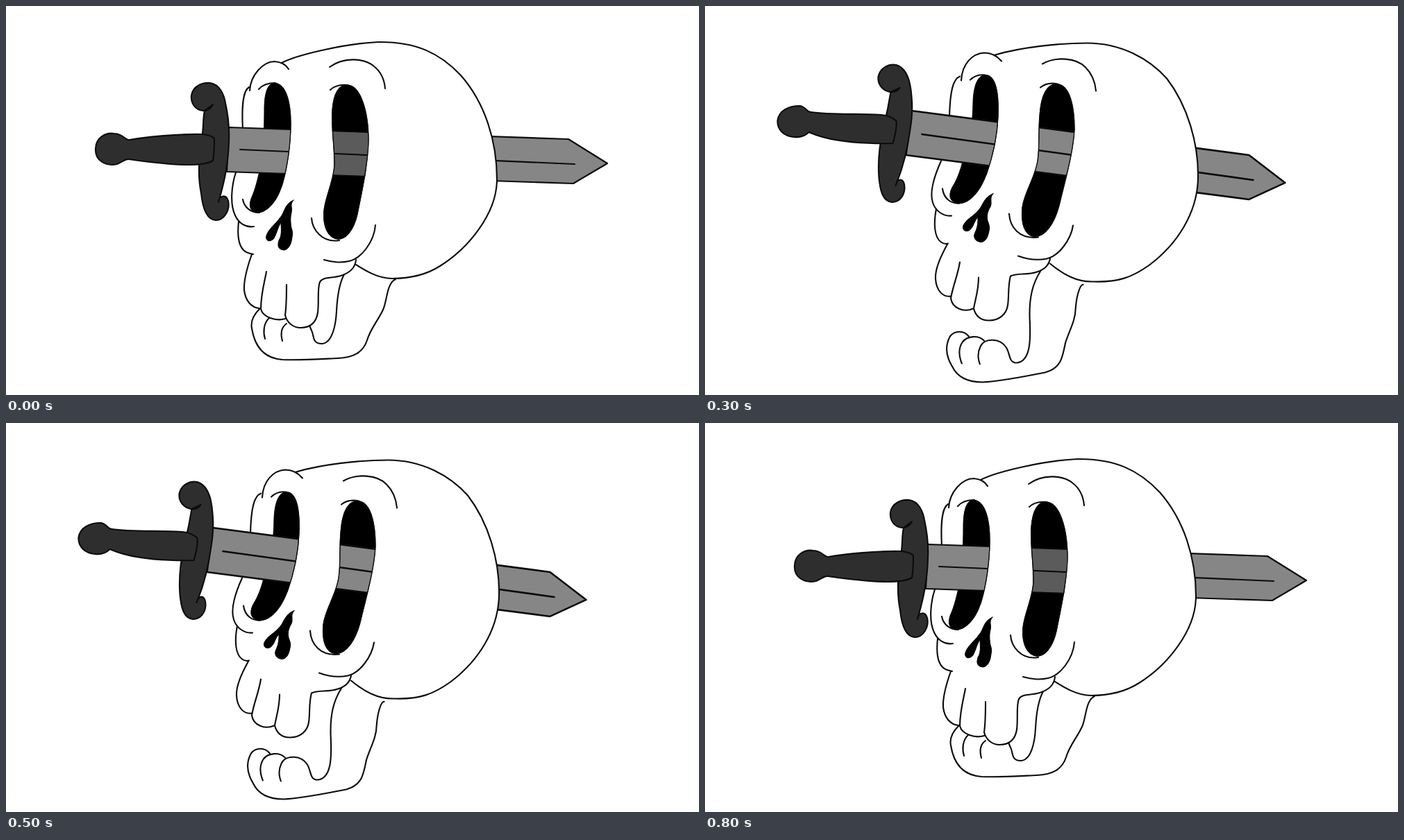
These frames come from a looping animation (998 px wide and 561 px high, 900 ms). An HTML page:

```html
<!DOCTYPE html>
<html lang="en">
<head>
<meta charset="utf-8">
<title>Skull and sword</title>
<style>
html, body { margin: 0; width: 100%; height: 100%; overflow: hidden; background: #fff; }
svg {
  display: block; width: 100%; height: 100%;
  fill: none; stroke: #0b0b0b; stroke-width: 2.1; stroke-linecap: round; stroke-linejoin: round;
}
.hole { fill: #000; stroke: #000; stroke-width: 1; }
.rim { stroke-width: 1.4; }
.blade { fill: #868686; }
.hilt { fill: #2e2e2e; }
.shade { fill: #000; stroke: none; opacity: .32; }
.bold { stroke-width: 2.6; }
</style>
</head>
<body>
<svg viewBox="0 0 998 561">
  <defs>
    <path id="closedEye" d="M491 114C510 114 522 150 522 195C521 230 512 270 506 300C501 322 490 337 478 336C464 335 456 318 458 295C460 275 471 255 473 230C474 210 468 175 470 150C472 125 480 114 491 114Z"/>
    <path id="openEye" d="M507 114C525 115 532 145 532 180C530 215 518 255 511 285C504 315 490 334 475 334C460 333 455 315 457 292C460 270 475 250 479 225C482 205 480 185 482 160C484 130 492 114 507 114Z"/>
    <clipPath id="closedGaps">
      <path d="M0 0H386V111C404 112 410 140 410 170C410 200 405 235 397 260V561H0Z"/>
      <use href="#closedEye"/>
      <path d="M655 100C690 140 707 195 707 250C707 300 665 350 625 375H998V100Z"/>
    </clipPath>
    <clipPath id="openGaps">
      <path d="M-50 0H404V101C420 102 423 130 422 160C421 190 414 220 405 245V561H-50Z"/>
      <use href="#openEye"/>
      <path d="M665 106C695 145 711 200 710 250C709 300 680 345 640 375H998V106Z"/>
    </clipPath>
  </defs>

  <g id="closed">
    <!-- jaw -->
    <path d="M487 387C480 400 477 420 476 440C475 460 470 485 456 487C440 488 444 474 440 468L437 461"/>
    <path d="M365 437C357 445 352 455 354 465C358 490 370 508 398 510C425 511 455 509 478 508C500 507 514 500 520 482C525 465 535 455 543 438C549 425 548 400 561 394"/>
    <path d="M379 450C371 457 370 470 373 480M404 458C397 463 395 472 398 483"/>
    <!-- face -->
    <path d="M351 122C352 100 370 80 387 80C398 81 404 86 407 91M350 117C342 122 339 140 341 178M331 240C325 258 322 285 330 302C335 313 345 320 357 318"/>
    <path d="M341 279C343 290 352 298 365 298M364 120C369 114 378 111 388 111M467 121C473 115 482 113 492 114M440 306C441 322 455 342 480 338"/>
    <path d="M466 88C485 74 515 74 530 87C540 95 545 107 546 119M532 316C530 340 512 364 494 368C480 371 470 369 458 366"/>
    <path d="M335 311C333 330 335 345 342 352C347 357 352 357 356 358M354 358C348 375 342 395 343 410C345 425 353 435 365 436"/>
    <path d="M375 383C373 395 367 415 367 437C370 449 389 455 402 451M404 402C404 420 404 432 402 446C405 458 415 464 424 464C440 464 447 455 449 442C451 425 448 408 452 398C456 390 470 393 482 389C495 385 503 377 504 366"/>
    <path class="hole" d="M386 111C404 112 410 140 410 170C410 200 405 235 397 260C390 283 375 298 363 298C352 297 349 290 353 278C360 262 362 250 366 235C371 210 372 170 372 150C372 130 375 112 386 111Z"/>
    <use class="hole" href="#closedEye"/>
    <path class="hole" d="M414 280C408 287 413 291 411 298C409 306 410 314 411 320C413 326 413 329 412 333C411 346 405 352 400 352C391 351 391 345 393 338C398 330 396 320 396 312C391 320 390 328 386 335C381 341 373 340 375 331C379 320 388 315 394 306C402 298 400 286 414 280Z"/>
    <!-- sword -->
    <g clip-path="url(#closedGaps)">
      <path class="blade" d="M321 175L810 192 866 227 817 256 318 239Z"/>
      <path d="M337 207L819 228"/>
      <path class="hilt" d="M298 142C295 148 290 151 284 151C272 150 266 140 267 129C269 116 282 110 294 111C308 113 314 128 316 140C320 158 322 175 321 195C320 230 314 255 306 283C307 273 317 271 320 281C323 295 314 309 302 309C288 308 283 290 281 270C275 240 279 215 282 190C285 175 283 165 286 151Z"/>
      <path class="hilt" d="M178 193C200 189 250 184 284 185C292 186 297 188 300 191C300 200 300 212 298 223C290 228 275 229 262 229C235 229 205 225 177 221C172 220 168 225 160 228C143 232 128 222 129 206C129 190 143 182 156 184C168 184 172 194 178 193Z"/>
    </g>
    <path class="shade" d="M471 180H522L518 246H472Z"/>
    <use class="rim" href="#closedEye"/>
    <path class="rim" d="M386 111C404 112 410 140 410 170C410 200 405 235 397 260"/>
    <path d="M397 82C420 70 490 54 536 52C590 51 625 68 655 100C690 140 707 195 707 250C707 300 665 350 625 375C600 391 575 393 556 393C535 393 515 380 504 373"/>
  </g>

  <g id="open">
    <!-- jaw -->
    <path id="ramus"/>
    <g id="chin">
      <path d="M470 445C471 470 471 500 452 503C439 504 442 490 436 481C427 467 405 467 399 479C395 487 395 497 398 505M404 471C396 463 380 464 373 473C367 482 368 494 372 504"/>
      <path d="M382 465C375 456 362 456 355 465C347 480 350 495 358 508C365 523 380 531 402 531C430 530 470 521 492 517C515 511 517 495 521 475"/>
    </g>
    <!-- face -->
    <path d="M369 109C370 85 385 70 402 69C414 69 422 75 427 81M367 103C357 107 353 125 352 160M340 225C331 245 323 270 328 285C332 298 344 305 355 304"/>
    <path d="M342 265C344 280 355 287 367 286M382 108C388 102 396 100 403 101M483 119C490 113 498 112 508 114M438 301C439 320 452 338 480 335"/>
    <path d="M486 85C505 74 535 76 548 90C558 100 562 112 563 124M530 318C527 338 510 362 492 366C477 369 462 366 451 362"/>
    <path d="M333 294C329 315 330 335 340 342C344 345 347 345 350 344M349 345C340 362 331 380 332 395C333 412 343 422 354 420"/>
    <path d="M367 371C364 390 357 405 354 423C356 437 372 444 386 438M394 393C394 412 389 425 387 438C390 449 398 455 409 455C424 455 434 446 436 433C438 420 436 405 440 391C450 386 465 390 478 385C488 382 495 376 497 366"/>
    <path class="hole" d="M404 101C420 102 423 130 422 160C421 190 414 220 405 245C396 270 380 287 366 286C352 285 350 275 356 263C364 250 368 238 372 222C380 200 386 170 386 140C387 115 393 101 404 101Z"/>
    <use class="hole" href="#openEye"/>
    <path class="hole" d="M415 272C409 279 414 284 411 291C406 299 405 307 408 314C410 319 410 323 409 326C407 337 403 342 397 342C388 341 386 334 389 328C393 320 393 312 393 306C388 311 387 319 383 323C378 329 369 326 372 318C376 309 386 305 392 298C401 290 400 278 415 272Z"/>
    <!-- sword -->
    <g clip-path="url(#openGaps)">
      <g id="sword">
        <path class="blade bold" d="M259 148L745 212 797 252 745 276 251 212Z"/>
        <path class="bold" d="M274 182L751 248"/>
        <path class="hilt" d="M242 115C239 120 233 122 228 121C217 119 210 110 211 99C214 86 226 80 237 82C250 86 256 102 258 118C260 135 261 150 257 175C253 205 247 230 236 256C240 243 249 246 249 260C248 273 240 280 231 280C218 279 214 265 212 245C210 220 213 195 219 170C224 150 226 140 229 121Z"/>
        <path class="hilt" d="M114 150C140 154 185 152 215 154C226 155 233 159 237 163C238 173 235 185 232 195C215 196 180 195 155 191C140 189 125 185 111 179C105 185 98 187 90 186C75 185 65 175 66 162C68 148 82 141 98 141C107 142 107 150 114 150Z"/>
      </g>
    </g>
    <use class="rim" href="#openEye"/>
    <path class="rim" d="M404 101C420 102 423 130 422 160C421 190 414 220 405 245"/>
    <path d="M418 72C455 61 510 55 550 55C600 55 640 78 665 106C695 145 711 200 710 250C709 300 680 345 640 375C615 393 595 400 560 399C535 400 515 388 497 373"/>
  </g>
</svg>
<script>
const el = id => document.getElementById(id);
const STEP = 100;

// slide: sword along its axis, lift: whole head, drop: jaw opening
const shut = null;
const ajar = { slide: 0, lift: 0, drop: 0 };
const wide = { slide: -48, lift: -2, drop: 29 };
const half = { slide: 38.5, lift: -1.5, drop: 13 };
const poses = [shut, ajar, wide, half, wide, half, wide, ajar, shut];

const move = (id, x, y) => el(id).setAttribute('transform', `translate(${x} ${y})`);

function ramus(drop) {
  const back = drop / 6;
  return `M483 384C473 400 ${469 - back * 1.5} 420 ${470 - back} ${445 + drop}` +
    `M${551 - back * 3} ${399 + back * 2}C${544 - back} 403 ${540 - back * 2} 412 ${538 - back * 2} ${430 + drop * .6}` +
    `C${538 - back * 2} ${445 + drop * .8} ${526 - back} ${458 + drop} ${521 - back} ${475 + drop}`;
}

function show(pose) {
  el('closed').style.display = pose ? 'none' : '';
  el('open').style.display = pose ? '' : 'none';
  if (!pose) return;
  move('open', 0, pose.lift);
  move('sword', pose.slide, pose.slide * .115);
  move('chin', -pose.drop / 6, pose.drop);
  el('ramus').setAttribute('d', ramus(pose.drop));
}

function tick() {
  show(poses[Math.floor(performance.now() / STEP) % poses.length]);
  requestAnimationFrame(tick);
}
tick();
</script>
</body>
</html>
```
